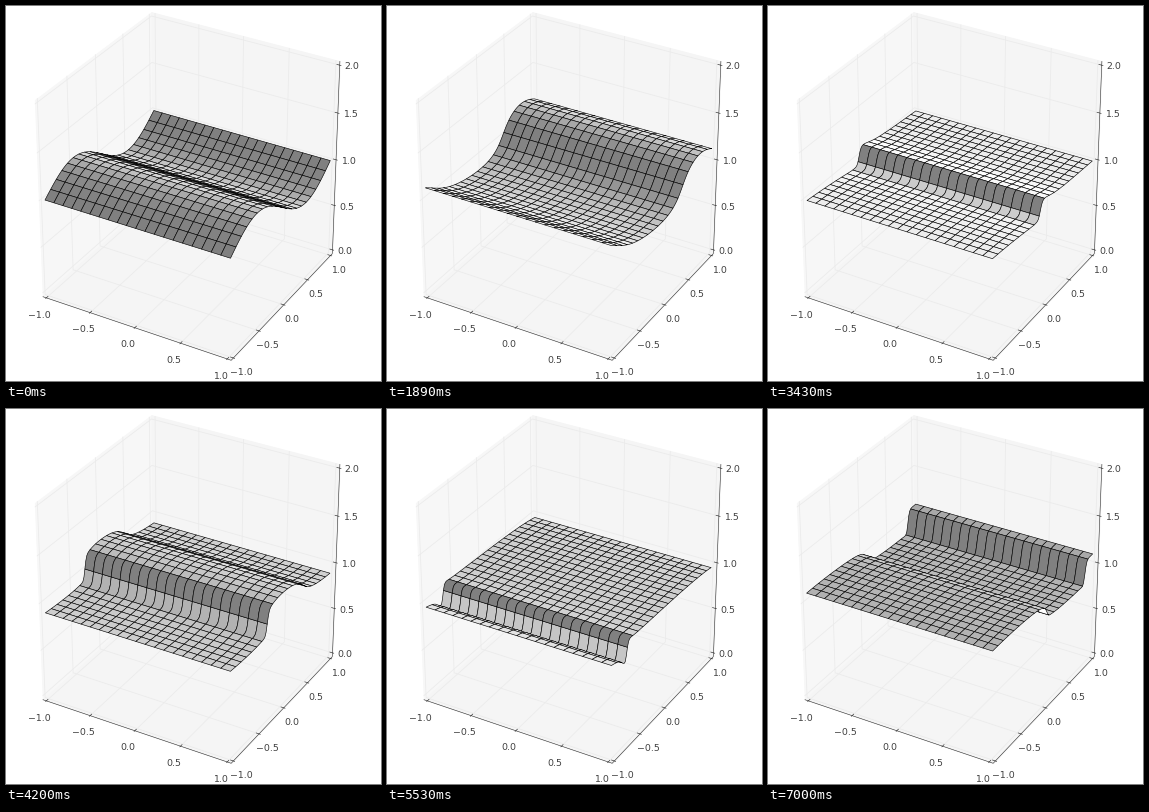
A matplotlib script that plays this animation: 375 by 375 pixels, repeating every 7070 ms.

```python
import matplotlib.pyplot as plt
import numpy as np
from matplotlib.animation import FuncAnimation
from matplotlib.collections import LineCollection, PolyCollection

SIZE = 375
FRAMES, INTERVAL = 101, 70
NY, STRIDE = 100, 5          # fine points along y, points per drawn cell
CELLS = NY // STRIDE
DT, SUBSTEPS = 0.031, 6      # model time per frame
DY = 2 / NY
EDGE = 1 + 1 / 24            # panes sit slightly outside the data limits

# Camera at azimuth -60, elevation 30, ten units from the centre
RIGHT = np.array([np.sqrt(3) / 2, 0.5, 0])
UP = np.array([-0.25, np.sqrt(3) / 4, np.sqrt(3) / 2])
TOWARD = np.array([np.sqrt(3) / 4, -0.75, 0.5])
LIGHT = np.array([-1, -1, 0.5])


def project(points):
    """Pixel positions and distance for points in data coordinates."""
    p = (np.asarray(points, float) - [0, 0, 1]) / 2
    dist = 10 - p @ TOWARD
    px = 183.9 + 2088 * (p @ RIGHT) / dist
    py = 174.0 - 2155 * (p @ UP) / dist
    return np.stack([px, py], axis=-1), dist


# Shallow water waves on a periodic channel with uniform initial discharge
def flux(w):
    h, q = w
    return np.array([q, q * q / h + h * h / 2])


def rate(w):
    back = w - np.roll(w, 1, axis=1)
    ahead = np.roll(back, -1, axis=1)
    total = back + ahead
    slope = 2 * np.maximum(back * ahead, 0) / np.where(total == 0, 1, total)
    left = w + slope / 2
    right = np.roll(w - slope / 2, -1, axis=1)
    speed = np.max(np.abs(w[1] / w[0]) + np.sqrt(w[0]))
    f = (flux(left) + flux(right) - speed * (right - left)) / 2
    return (np.roll(f, 1, axis=1) - f) / DY


def solve():
    y = -1 + DY * np.arange(NY)
    w = np.array([1 - 0.2 * np.sin(np.pi * y), np.full(NY, 0.3)])
    dt = DT / SUBSTEPS
    heights = []
    for _ in range(FRAMES):
        heights.append(np.append(w[0], w[0, 0]))
        for _ in range(SUBSTEPS):
            mid = w + dt * rate(w)
            w = (w + mid + dt * rate(mid)) / 2
    return heights


def cell_corners(heights):
    """One polygon per cell: along y at one x, back at the next x."""
    y = np.linspace(-1, 1, NY + 1)
    x = np.linspace(-1, 1, CELLS + 1)
    cells = []
    for i in range(CELLS):
        for j in range(CELLS):
            part = slice(j * STRIDE, (j + 1) * STRIDE + 1)
            ys, zs = y[part], heights[part]
            xs = np.repeat(x[i:i + 2], STRIDE + 1)
            cells.append(np.column_stack(
                [xs, np.append(ys, ys[::-1]), np.append(zs, zs[::-1])]))
    return np.array(cells)


def shade(cells):
    a = cells[:, 0]
    b = cells[:, STRIDE].copy()
    b[:, 0] += 2 / CELLS / 3
    c = cells[:, -2 - STRIDE // 5]
    normal = np.cross(a - b, b - c)
    normal /= np.linalg.norm(normal, axis=1, keepdims=True)
    s = normal @ LIGHT
    s = (s - s.min()) / max(np.ptp(s), 1e-9)
    return 0.5 + 0.5 * s


fig = plt.figure(figsize=(5, 5), dpi=75, facecolor="white")
ax = fig.add_axes([0, 0, 1, 1])
ax.set_xlim(0, SIZE)
ax.set_ylim(SIZE, 0)
ax.axis("off")

LO, HI = -EDGE, EDGE
ZLO, ZHI = 1 - EDGE, 1 + EDGE
PX = 72 / 75                 # points per pixel


def add_lines(paths, color, width, order):
    ax.add_collection(LineCollection(
        [project(p)[0] for p in paths], colors=color,
        linewidths=width * PX, zorder=order))


def add_box():
    panes = [
        ([(LO, LO, ZLO), (LO, HI, ZLO), (LO, HI, ZHI), (LO, LO, ZHI)], "0.97"),
        ([(LO, HI, ZLO), (HI, HI, ZLO), (HI, HI, ZHI), (LO, HI, ZHI)], "0.96"),
        ([(LO, LO, ZLO), (HI, LO, ZLO), (HI, HI, ZLO), (LO, HI, ZLO)], "0.96"),
    ]
    for corners, gray in panes:
        ax.add_collection(PolyCollection(
            [project(corners)[0]], facecolors=gray, edgecolors=gray,
            linewidths=0.8 * PX, zorder=0))

    grid, ticks = [], []
    inner, outer = EDGE - 1 / 30, EDGE + 1 / 60
    for t in np.linspace(-1, 1, 5):
        z = t + 1
        grid += [
            [(t, LO, ZLO), (t, HI, ZLO), (t, HI, ZHI)],
            [(HI, t, ZLO), (LO, t, ZLO), (LO, t, ZHI)],
            [(HI, HI, z), (LO, HI, z), (LO, LO, z)],
        ]
        ticks += [
            [(t, -inner, ZLO), (t, -outer, ZLO)],
            [(inner, t, ZLO), (outer, t, ZLO)],
            [(inner, HI, z), (outer, HI, z)],
        ]
        add_label((t, LO, ZLO), t, -6.5, 16.3)
        add_label((HI, t, ZLO), t, 8, 13.8)
        add_label((HI, HI, z), z, 12.4, 0.9)
    axes = [
        [(LO, LO, ZLO), (HI, LO, ZLO)],
        [(HI, LO, ZLO), (HI, HI, ZLO)],
        [(HI, HI, ZLO), (HI, HI, ZHI)],
    ]
    add_lines(grid, "0.92", 0.8, 1)
    add_lines(axes, "0.15", 0.55, 2)
    add_lines(ticks, "0.15", 0.6, 2)


def add_label(point, value, dx, dy):
    (x, y), _ = project(point)
    text = f"{value:.1f}".replace("-", "\u2212")
    ax.text(x + dx, y + dy + 3.4, text, family="DejaVu Sans",
            size=9.4 * PX, color="0.25", ha="center", va="baseline", zorder=5)


add_box()
surface = PolyCollection([], edgecolors="black", linewidths=0.6 * PX,
                         joinstyle="round", zorder=3)
ax.add_collection(surface)
history = solve()


def draw(k):
    cells = cell_corners(history[k])
    verts, dist = project(cells)
    order = np.argsort(-dist.mean(axis=1))
    gray = shade(cells)[order]
    surface.set_verts(verts[order])
    surface.set_facecolor(np.repeat(gray[:, None], 3, axis=1))
    return [surface]


anim = FuncAnimation(fig, draw, frames=FRAMES, interval=INTERVAL,
                     init_func=lambda: draw(0), repeat=True)
plt.show()
```
